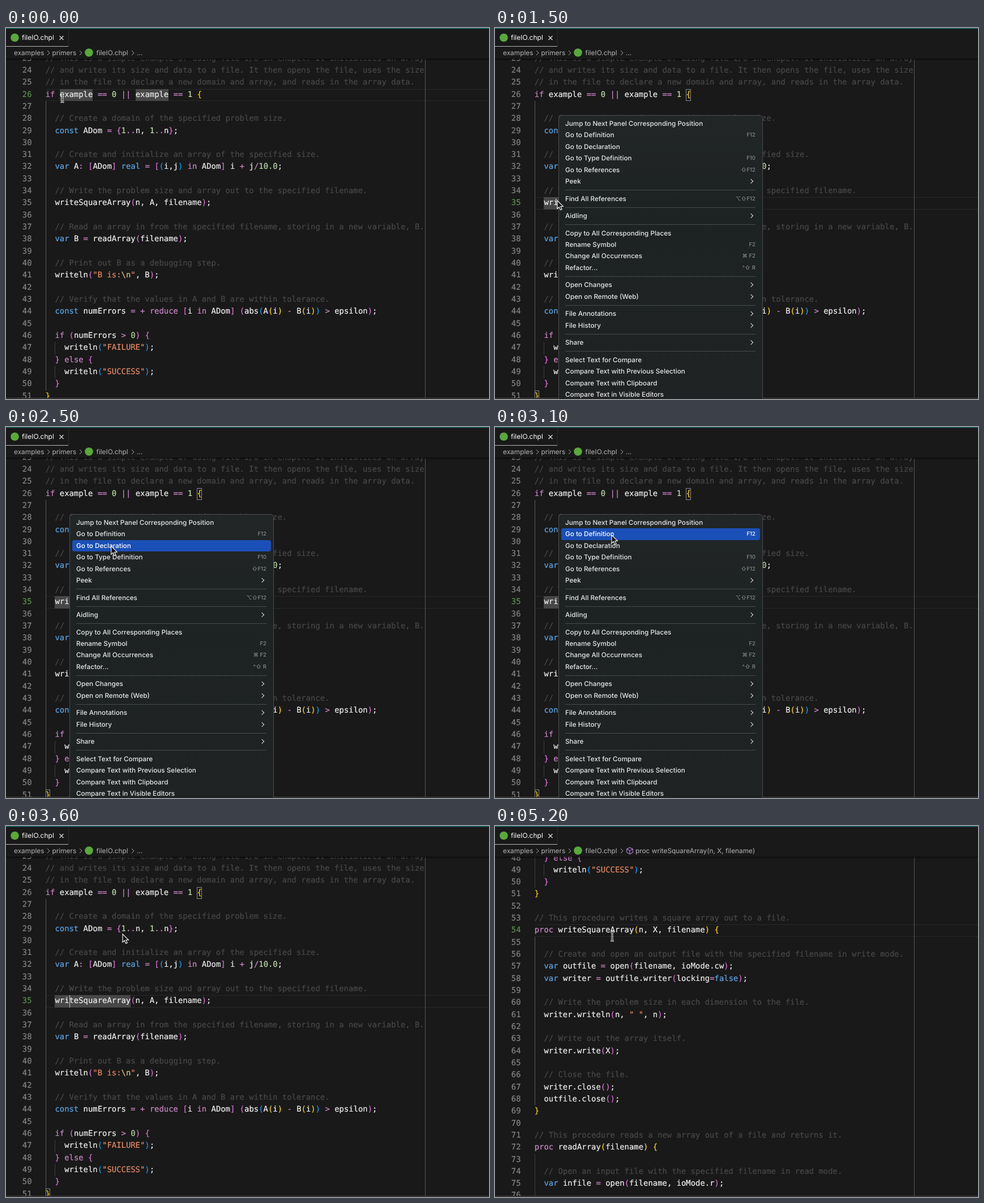
Write an HTML page that moves like this. It is 853 px wide and 656 px high and loops after 5.3 s.

```html
<!DOCTYPE html>
<html lang="en">
<head>
<meta charset="utf-8">
<title>Go to Definition</title>
<style>
  html, body { margin: 0; width: 100%; height: 100%; overflow: hidden; background: #191919; }
  #stage { position: relative; width: 853px; height: 656px; overflow: hidden; background: #191919;
    text-rendering: geometricPrecision; }
  #stage div, #stage svg { position: absolute; box-sizing: border-box; }
  #doc { left: 0; width: 853px; font: 13.9px "DejaVu Sans Mono", monospace; color: #f0f0f0; }
  .line, .number { height: 21.32px; line-height: 21.32px; white-space: pre; -webkit-text-stroke: 0.2px; }
  .line { left: 69.7px; }
  .number { left: 0; width: 45.6px; text-align: right; color: #858585; }
  .number.active { color: #5d9150; }
  .comment { color: #484848; }
  .string { color: #e58a62; }
  .escape { color: #e0bf80; }
  .type { color: #5ba6e6; }
  .keyword, .op { color: #cd88c6; }
  .num { color: #bddba8; }
  .b0 { color: #ffd700; }
  .b1 { color: #da70d6; }
  .b2 { color: #179fff; }
  .current { border: solid #282828; border-width: 1px 0; }
  .word { background: #474747; }
  .match { border: 1px solid #888; }
  .guide { background: #3c3c3c; }
  .guide.lit { background: #585858; }
  .caret { background: #c4c4c4; }
  #ruler { left: 740px; top: 54px; width: 1px; height: 600px; background: #555; }
  #footer { top: 654px; width: 853px; height: 2px; background: #191919; border-top: 1px solid #4c4c4c; }
  #header { left: 0; top: 0; font: 11.85px Inter, sans-serif; fill: #b4b4b4; }
  #menu { left: 111.5px; top: 154px; width: 361px; height: 520px; padding-top: 4px; border: 1px solid #4b4e4e;
    border-radius: 6px; background: linear-gradient(#222626, #1d2222 30%, #1f2323); color: #e8eaea;
    font: 500 11.7px/20.4px Inter, "DejaVu Sans", sans-serif; }
  #menu .item { position: relative; height: 20.4px; margin: 0 4px; padding-left: 7.5px; border-radius: 4px; white-space: pre; }
  #menu .item.hover { background: #1b4fb8; color: #fff; }
  #menu .key { right: 7.5px; top: 1px; font-size: 9.6px; color: #858a8a; }
  #menu .hover .key { color: #fff; }
  #menu .more { right: 13px; top: 7px; width: 6px; height: 6px; border: solid #dcdede; border-width: 1.5px 1.5px 0 0; transform: rotate(45deg); }
  #menu .rule { position: relative; height: 1px; margin: 4.6px 11.5px; background: #474b4b; }
  #pointer { left: 0; top: 0; overflow: visible; }
</style>
</head>
<body>
<div id="stage">
  <div id="doc"></div>
  <div id="ruler"></div>
  <svg id="header" width="853" height="58">
    <defs><linearGradient id="shade" x2="0" y2="1"><stop stop-opacity=".6"/><stop offset="1" stop-opacity="0"/></linearGradient></defs>
    <rect width="853" height="54" fill="#191919"/>
    <rect y="54" width="853" height="4" fill="url(#shade)"/>
    <rect width="853" height="1.2" fill="#127577"/>
    <path d="M110.5 1V33" stroke="#2a2a2a"/>
    <path d="M0 32.5H110" stroke="#b9b9b9"/>
    <g fill="#5aa83c"><circle cx="15.5" cy="17" r="7.3"/><circle cx="146.5" cy="43.5" r="7.3"/></g>
    <text x="28" y="21.3" font-size="12" fill="#fff">fileIO.chpl</text>
    <path d="M94.5 14l7 7m0-7l-7 7" stroke="#ddd" stroke-width="1.2"/>
    <text x="14" y="48">examples</text><text x="81.5" y="48">primers</text><text x="159.5" y="48">fileIO.chpl</text>
    <path d="M73 40l4 4l-4 4M130 40l4 4l-4 4M222 40l4 4l-4 4" fill="none" stroke="#aaa"/>
    <text id="ellipsis" x="231" y="48">...</text>
    <g id="symbol">
      <path d="M238 38l5.3 2.7v6l-5.3 3l-5.3-3v-6zM232.7 40.7l5.3 2.8l5.3-2.8M238 43.5v6.2" fill="none" stroke="#b180d7" stroke-width="1.1"/>
      <text x="248" y="48">proc writeSquareArray(n, X, filename)</text>
    </g>
  </svg>
  <div id="footer"></div>
  <div id="menu"></div>
  <svg id="pointer" width="20" height="24">
    <defs><path id="beamShape" d="M-2 -4Q1 -4 1 -2Q1 -4 4 -4M1 -3V11M-2 12Q1 12 1 10Q1 12 4 12M-1 7H3"/></defs>
    <path id="arrow" d="M0 0V14.5L3.3 11.5L5.6 16.8L8.2 15.7L5.9 10.5H10.4Z" fill="#111" stroke="#fff" stroke-width="1.1"/>
    <g id="beam" fill="none">
      <use href="#beamShape" stroke="#f2f2f2" stroke-width="2.8"/>
      <use href="#beamShape" stroke="#161616"/>
    </g>
  </svg>
</div>
<script>
const LOOP = 5300, FIRST = 23, LINE = 21.32, CHAR = 8.368, LEFT = 69.7;
const code = String.raw`// This is a simple example of using file I/O in Chapel. It initializes an array
// and writes its size and data to a file. It then opens the file, uses the size
// in the file to declare a new domain and array, and reads in the array data.
if example == 0 || example == 1 {

  // Create a domain of the specified problem size.
  const ADom = {1..n, 1..n};

  // Create and initialize an array of the specified size.
  var A: [ADom] real = [(i,j) in ADom] i + j/10.0;

  // Write the problem size and array out to the specified filename.
  writeSquareArray(n, A, filename);

  // Read an array in from the specified filename, storing in a new variable, B.
  var B = readArray(filename);

  // Print out B as a debugging step.
  writeln("B is:\n", B);

  // Verify that the values in A and B are within tolerance.
  const numErrors = + reduce [i in ADom] (abs(A(i) - B(i)) > epsilon);

  if (numErrors > 0) {
    writeln("FAILURE");
  } else {
    writeln("SUCCESS");
  }
}

// This procedure writes a square array out to a file.
proc writeSquareArray(n, X, filename) {

  // Create and open an output file with the specified filename in write mode.
  var outfile = open(filename, ioMode.cw);
  var writer = outfile.writer(locking=false);

  // Write the problem size in each dimension to the file.
  writer.writeln(n, " ", n);

  // Write out the array itself.
  writer.write(X);

  // Close the file.
  writer.close();
  outfile.close();
}

// This procedure reads a new array out of a file and returns it.
proc readArray(filename) {

  // Open an input file with the specified filename in read mode.
  var infile = open(filename, ioMode.r);
`;
const menuItems = [
  ["Jump to Next Panel Corresponding Position"], ["Go to Definition", "F12"], ["Go to Declaration"],
  ["Go to Type Definition", "F10"], ["Go to References", "⇧F12"], ["Peek", ">"], null,
  ["Find All References", "⌥⇧F12"], null, ["Aidling", ">"], null,
  ["Copy to All Corresponding Places"], ["Rename Symbol", "F2"], ["Change All Occurrences", "⌘ F2"],
  ["Refactor...", "^⇧ R"], null, ["Open Changes", ">"], ["Open on Remote (Web)", ">"], null,
  ["File Annotations", ">"], ["File History", ">"], null, ["Share", ">"], null,
  ["Select Text for Compare"], ["Compare Text with Previous Selection"],
  ["Compare Text with Clipboard"], ["Compare Text in Visible Editors"]
];
// Pointer hotspot: time, x, y
const path = [[0, 98.5, 119], [100, 98.5, 119], [700, 110, 305], [1900, 110, 305],
  [2100, 128, 267], [2700, 206, 191], [LOOP, 206, 191]];

const $ = id => document.getElementById(id);
const doc = $("doc"), menu = $("menu");

function add(parent, className, html = "", style = {}) {
  const el = document.createElement("div");
  el.className = className;
  el.innerHTML = html;
  Object.assign(el.style, style);
  return parent.appendChild(el);
}
const rowTop = n => (n - FIRST) * LINE + "px";

function mark(className, line, col, chars, lines = 1) {
  return add(doc, className, "", { left: LEFT + col * CHAR + "px", top: rowTop(line),
    width: typeof chars === "string" ? chars : chars * CHAR + "px", height: lines * LINE + "px" });
}

let depth = 0;
const tokens = /(?<comment>\/\/.*)|(?<string>"[^"]*")|\b(?<type>const|var|real|false)\b|\b(?<keyword>if|else|in|reduce|proc)\b|(?<num>\d+(?:\.\d+)?)|(?<bracket>[()[\]{}])|(?<op>\.\.|\|\||[=+\-\/>:])/g;
function paint(text) {
  return text.replace(tokens, (token, ...rest) => {
    const groups = rest.at(-1);
    let kind = Object.keys(groups).find(k => groups[k] !== undefined);
    if (kind === "bracket") kind = "b" + ("([{".includes(token) ? depth++ : --depth) % 3;
    if (kind === "string") token = token.replace(/\\./, '<span class="escape">$&</span>');
    return `<span class="${kind}">${token}</span>`;
  });
}

// Backgrounds go first so the text lies above them
const current = mark("current", 26, 0, "784px");
const exampleWords = [mark("word", 26, 3, 7), mark("word", 26, 19, 7)];
const calledWord = mark("word", 35, 2, 16);
const braces = [mark("match", 26, 32, 1), mark("match", 51, 0, 1)];
const mainGuide = mark("guide", 27, 0, "1px", 24);
const procGuide = mark("guide", 55, 0, "1px", 14);
mark("guide", 73, 0, "1px", 4);
mark("guide", 47, 2, "1px");
mark("guide", 49, 2, "1px");
const numbers = code.split("\n").map((text, i) => {
  const top = rowTop(FIRST + i);
  add(doc, "line", paint(text), { top });
  return add(doc, "number", FIRST + i, { top });
});
const caret = mark("caret", 35, 5, "1.5px");

const rows = [];
for (const item of menuItems) {
  if (!item) { add(menu, "rule"); continue; }
  const [label, key] = item, row = add(menu, "item", label);
  if (key === ">") add(row, "more");
  else if (key) add(row, "key", key);
  rows.push(row);
}

function pointerAt(t) {
  const i = path.findIndex(p => p[0] > t);
  const [t0, x0, y0] = path[i - 1], [t1, x1, y1] = path[i];
  const s = (t - t0) / (t1 - t0), e = s * s * (3 - 2 * s);
  return [x0 + (x1 - x0) * e, y0 + (y1 - y0) * e];
}
const show = (el, on) => el.style.visibility = on ? "visible" : "hidden";

function draw() {
  const t = Math.floor(performance.now() % LOOP / 100) * 100;
  const within = (a, b) => t >= a && t < b;
  const jumped = t >= 3700, line = jumped ? 54 : t >= 800 ? 35 : 26;

  doc.style.top = (jumped ? -486.5 : 43.6) + "px";
  current.style.top = caret.style.top = rowTop(line);
  numbers.forEach((el, i) => el.classList.toggle("active", FIRST + i === line));
  mainGuide.classList.toggle("lit", !jumped);
  procGuide.classList.toggle("lit", jumped);
  exampleWords.forEach(el => show(el, t < 800));
  show(calledWord, within(1000, 3700));
  braces.forEach(el => show(el, within(1000, 3700)));
  show(caret, within(800, 1400) || within(3500, 4200) || within(4700, 5200));
  show($("ellipsis"), !jumped);
  show($("symbol"), jumped);

  const [x, y] = pointerAt(t), arrow = within(1400, 3900);
  $("pointer").style.transform = `translate(${x}px, ${y}px)`;
  show($("arrow"), arrow);
  show($("beam"), !arrow);

  menu.style.opacity = within(1400, 3500) ? 1 : within(3500, 3600) ? 0.4 : 0;
  const hovered = t >= 2200 && t !== 3300 ? Math.floor((y - 158.8) / 20.4) : -1;
  rows.forEach((row, i) => row.classList.toggle("hover", i === hovered));
  requestAnimationFrame(draw);
}
draw();
</script>
</body>
</html>
```
